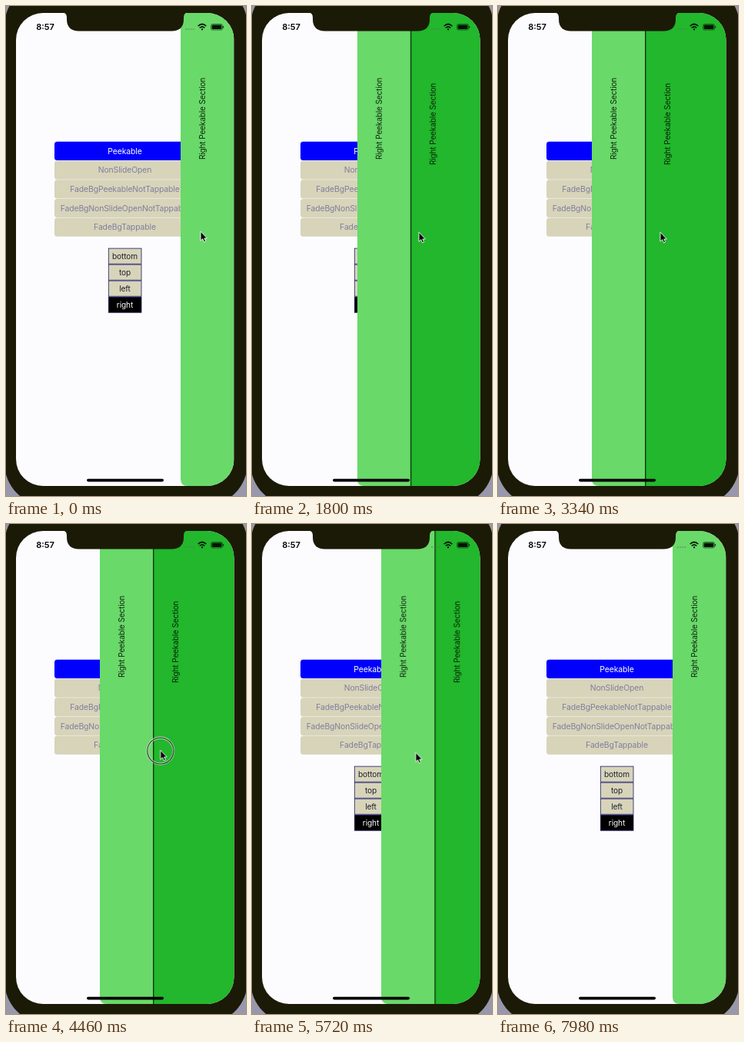
These frames come from a looping animation (312x635 px, 8000 ms). An HTML page:

```html
<!DOCTYPE html>
<html lang="en">
<head>
<meta charset="utf-8">
<title>Peekable panel</title>
<style>
  html, body { margin: 0; width: 100%; height: 100%; overflow: hidden; background: #9997ab; }
  svg { display: block; width: 312px; height: 635px; }
  text { font-family: Inter, Roboto, sans-serif; font-size: 10.4px; letter-spacing: -.1px; text-anchor: middle; }
  .small { font-size: 10.1px; }
  .side { font-size: 10px; letter-spacing: -.12px; }
  .time { font-size: 11px; font-weight: 600; letter-spacing: 0; }
</style>
</head>
<body>
<svg viewBox="0 0 312 635">
  <defs>
    <clipPath id="screen"><rect x="13" y="9" width="283.5" height="613" rx="35"/></clipPath>
  </defs>
  <rect x="-2" y="-30" width="316" height="678" rx="56" fill="#1b1a06"/>
  <g clip-path="url(#screen)">
    <rect x="13" y="9" width="284" height="613" fill="#fcfcff"/>
    <g id="options"></g>
    <g id="panel">
      <rect x="296" y="9" width="106" height="613" fill="#22b72c"/>
      <rect x="296" y="9" width="1.4" height="613" fill="#0b3a0c"/>
      <path d="M296 9H236Q227 9 227 18V613Q227 622 236 622H296Z" fill="#69d969"/>
      <text class="side" transform="translate(258.7 146) rotate(-90)" fill="#102410">Right Peekable Section</text>
      <text class="side" transform="translate(329 153) rotate(-90)" fill="#082408">Right Peekable Section</text>
    </g>
    <path d="M73 8Q79 9 79 15V17Q79 32.5 95 32.5H215Q231 32.5 231 17V15Q231 9 237 8Z" fill="#1b1a06"/>
    <text class="time" x="51" y="31">8:57</text>
    <path d="M233 30H245" stroke="#5a7a5a" stroke-width="1.5" stroke-dasharray="2 1.2" opacity=".6"/>
    <g fill="none" stroke="#051405" stroke-width="1.7">
      <path d="M249.7 26Q255 21 260.3 26M251.8 28.3Q255 25.4 258.2 28.3"/>
      <path d="M254 30.3H256" stroke-width="2"/>
    </g>
    <rect x="266.5" y="23.5" width="15" height="7.5" rx="2" fill="none" stroke="#0b3a0c" stroke-width=".7"/>
    <rect x="267.6" y="24.6" width="12.8" height="5.3" rx="1" fill="#051405"/>
    <path d="M282.6 26V28.6" stroke="#0b3a0c"/>
    <rect x="105" y="612.8" width="100" height="3.6" rx="1.8"/>
  </g>
  <g id="cursor">
    <g id="press" fill="none">
      <circle r="17" stroke="#fff" stroke-opacity=".7" stroke-width="2.8"/>
      <circle r="17" stroke="#111" stroke-width="1.1"/>
    </g>
    <path d="M0 -.8V11.2L2.7 8.7L4.6 12.8L6.6 11.9L4.8 8H8.4Z" stroke="#fff" stroke-width=".9"/>
  </g>
</svg>
<script>
const DURATION = 8000;
const get = id => document.getElementById(id);

function addButton(label, x, y, width, height, fill, ink, extra = {}) {
  const make = (tag, attrs) => {
    const node = document.createElementNS('http://www.w3.org/2000/svg', tag);
    for (const [key, value] of Object.entries(attrs)) node.setAttribute(key, value);
    return get('options').appendChild(node);
  };
  make('rect', { x, y, width, height, fill, ...extra });
  make('text', { x: 154.5, y: y + height / 2 + 3.7, fill: ink, class: extra.stroke ? 'small' : '' }).textContent = label;
}

['Peekable', 'NonSlideOpen', 'FadeBgPeekableNotTappable', 'FadeBgNonSlideOpenNotTappable', 'FadeBgTappable']
  .forEach((label, i) => addButton(label, 63, 175.8 + i * 24.7, 183, 24.2,
    i ? '#d7d4ba' : '#0000fc', i ? '#807f9e' : '#fff', { rx: 3.5 }));

['bottom', 'top', 'left', 'right']
  .forEach((label, i) => addButton(label, 133.3, 314.1 + i * 21, 42.7, 20.1,
    i < 3 ? '#d7d4ba' : '#000', i < 3 ? '#20202c' : '#fff', { stroke: '#1d1a66', 'stroke-width': .8 }));

// Steps are [time, value, easing to the next step].
function play(id, steps, toStyle) {
  get(id).animate(
    steps.map(([time, value, easing = 'linear']) => ({ offset: time / DURATION, easing, ...toStyle(value) })),
    { duration: DURATION, iterations: Infinity });
}

const move = ([x, y]) => ({ transform: `translate(${x}px, ${y}px)` });
const fade = opacity => ({ opacity });
const HOLD = 'step-end';
const SLIDE = 'ease-in-out';

// Each drag moves panel and cursor together; on release the panel slides on by itself.
play('panel', [
  [0, [0, 0]], [800, [0, 0], SLIDE], [1280, [-25, 0]],
  [1450, [-25, 0], SLIDE], [1950, [-105, 0]],
  [4600, [-105, 0], SLIDE], [5200, [-93, 0]],
  [5517, [-93, 0], SLIDE], [6000, [0, 0]], [8000, [0, 0]]
], move);

play('cursor', [
  [0, [253, 293], SLIDE], [600, [242, 295]], [800, [242, 295], SLIDE],
  [1280, [217, 295]], [1450, [217, 294]], [3000, [217, 294], SLIDE],
  [3800, [200.7, 294]], [4600, [200.7, 294], SLIDE], [5200, [212.7, 297]], [8000, [213, 297]]
], move);

play('cursor', [[0, 1, HOLD], [7000, 0, HOLD], [8000, 0]], fade);
play('press', [[0, 0, HOLD], [700, 1, HOLD], [1450, 0, HOLD], [4400, 1, HOLD], [5517, 0, HOLD], [8000, 0]], fade);
</script>
</body>
</html>
```
